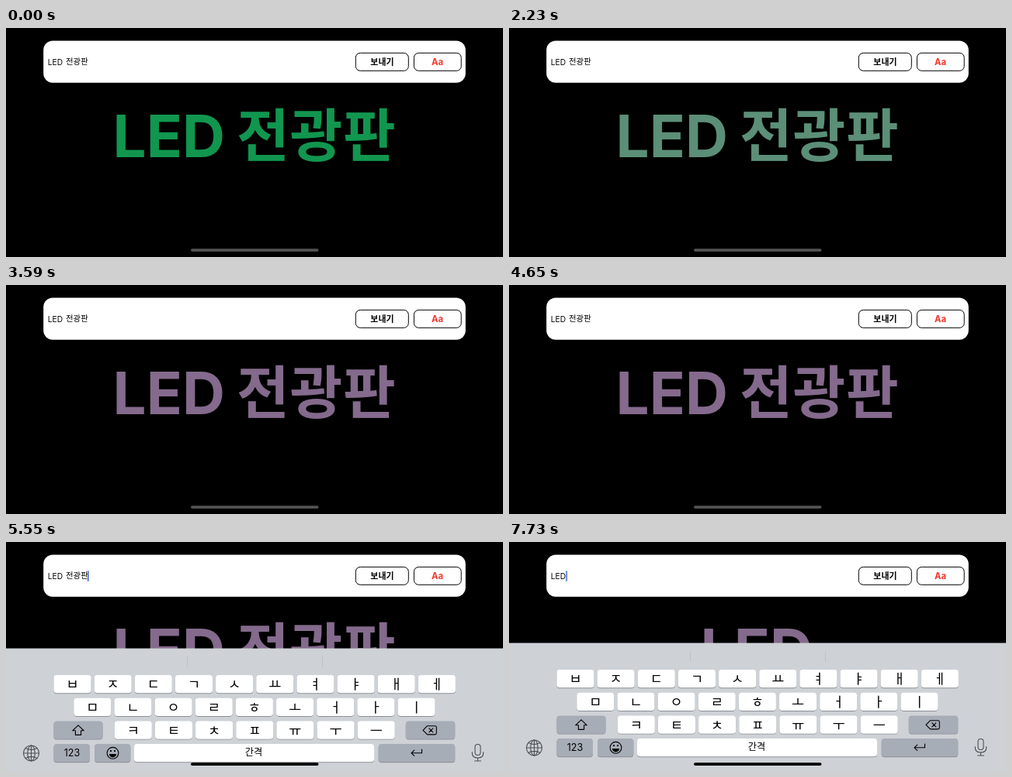
These frames come from a looping animation (640x296 px, 8 s). An HTML page:

```html
<!DOCTYPE html>
<html lang="ko">
<head>
<meta charset="utf-8">
<title>LED 전광판</title>
<style>
  html, body { margin: 0; width: 100%; height: 100%; overflow: hidden; background: #000; }
  svg { display: block; width: 640px; height: 296px; }
  text { font-family: Inter, "Noto Sans CJK KR", "Noto Sans CJK", sans-serif; white-space: pre; }
  .mid { text-anchor: middle; }
  .bold { font-weight: 700; }
  .line { fill: none; stroke: #000; stroke-width: 1.1; stroke-linecap: round; stroke-linejoin: round; }
  .side { stroke: #4c5056; }

  .anim { animation: 8s step-end infinite; }
  .banner { animation-name: tint, recentre; font-weight: 700; }
  .tap { animation-name: tap; fill: #f5352b; }
  .board { animation-name: rise; }
  .home { animation-name: home; }
  .caret { animation-name: caret, blink; fill: #3563d8; }
  .cut1 { animation-name: cut1; }
  .cut2 { animation-name: cut2; }
  .cut3 { animation-name: cut3; }

  @keyframes tint {
    0% { fill: #11964f; }
    12.75% { fill: #3d8157; }
    16.875% { fill: #256a5f; }
    21.125% { fill: #4a7f72; }
    25.125% { fill: #5c8f78; }
    30.75% { fill: #6ea07c; }
    32.25% { fill: #7fd481; }
    36.5% { fill: #82997f; }
    42.125%, 100% { fill: #846a8c; }
  }
  @keyframes tap {
    0% { opacity: 1; }
    11.375% { opacity: .2; }
    12.75% { opacity: .6; }
    14.125% { opacity: 1; }
    15.5% { opacity: .2; }
    16.875% { opacity: .6; }
    18.25% { opacity: 1; }
    19.75% { opacity: .2; }
    21.125% { opacity: .6; }
    22.375% { opacity: 1; }
    23.75% { opacity: .2; }
    25.125% { opacity: .6; }
    26.5% { opacity: 1; }
    35.125% { opacity: .2; }
    36.5% { opacity: .6; }
    37.875% { opacity: 1; }
    40.75% { opacity: .2; }
    42.125% { opacity: .5; }
    43.5% { opacity: .8; }
    44.875%, 100% { opacity: 1; }
  }
  @keyframes rise {
    0% { transform: translateY(170px); }
    66.625% { transform: translateY(132px); }
    68% { transform: translateY(37px); }
    69.375% { transform: translateY(7px); }
    70.75% { transform: translateY(1.5px); }
    72.25% { transform: translateY(.3px); }
    73.75%, 100% { transform: none; }
  }
  @keyframes home {
    0% { fill: #525252; }
    68%, 100% { fill: #000; }
  }
  @keyframes recentre {
    0% { transform: none; }
    79.125% { transform: translateX(70px); }
    80.5%, 100% { transform: translateX(109px); }
  }
  @keyframes caret {
    0% { transform: translateX(105px); }
    77% { transform: translateX(86px); }
    79.125% { transform: translateX(76px); }
    80.5%, 100% { transform: translateX(73.3px); }
  }
  @keyframes blink {
    0% { opacity: 0; }
    64% { opacity: 1; }
    89% { opacity: .4; }
    91.125% { opacity: 0; }
    92.5% { opacity: .1; }
    93.875% { opacity: .35; }
    95.25% { opacity: .7; }
    96.625%, 100% { opacity: 1; }
  }
  @keyframes cut1 { 0% { opacity: 1; } 77%, 100% { opacity: 0; } }
  @keyframes cut2 { 0% { opacity: 1; } 79.125%, 100% { opacity: 0; } }
  @keyframes cut3 { 0% { opacity: 1; } 80.5%, 100% { opacity: 0; } }
</style>
</head>
<body>
<svg viewBox="0 0 640 296">
  <rect width="640" height="296"/>

  <g class="anim banner">
    <text x="137.6" y="167.3" font-size="76.2">LED</text>
    <g font-size="73.6" letter-spacing=".7">
      <text class="anim cut3" x="297.1" y="165.7">전</text>
      <text class="anim cut2" x="365.5" y="165.7">광판</text>
    </g>
  </g>

  <rect x="48.2" y="16.4" width="543.6" height="54.3" rx="12" fill="#fff"/>
  <text x="53.8" y="47.5" font-size="10.2">LED</text>
  <g font-size="10.4">
    <text class="anim cut2" x="77.1" y="47.4">전</text>
    <text class="anim cut1" x="86.6" y="47.4">광판</text>
  </g>
  <rect class="anim caret" y="37" width="1.5" height="14" rx=".7"/>

  <g fill="#fff" stroke="#000">
    <rect x="450.3" y="32.3" width="68" height="23" rx="6"/>
    <rect x="525.4" y="32.3" width="60.8" height="23" rx="6"/>
  </g>
  <text class="mid bold" x="484.4" y="48" font-size="10.9">보내기</text>
  <text class="mid bold anim tap" x="555.6" y="48" font-size="11.3">Aa</text>

  <g class="anim board">
    <rect y="130.5" width="640" height="166" fill="#ced2d6"/>
    <path d="M233.5 141v14M407.5 141v14" stroke="#bec2c7"/>
    <g id="keys"></g>
    <text class="mid" x="85" y="270.4" font-size="12.6">123</text>
    <text class="mid" x="319" y="269.3" font-size="12.2">간격</text>
    <!-- shift, delete, return -->
    <path class="line" d="M93 229.8l7.3 7h-3.7v5.6h-7.2v-5.6h-3.7z"/>
    <path class="line" d="M542.5 230.7h10q1.8 0 1.8 1.8v7.6q0 1.8-1.8 1.8h-10l-5.5-5.6zM544.8 233.8l5 5m0-5l-5 5"/>
    <path class="line" d="M535.5 261v4.8h-13.5m3.7-3.6l-3.7 3.6 3.7 3.6"/>
    <!-- emoji -->
    <circle class="line" cx="137.5" cy="265.8" r="7.4"/>
    <path d="M132.8 267h9.4q-.8 4.4-4.7 4.4t-4.7-4.4z"/>
    <circle cx="135" cy="263.2" r="1.1"/>
    <circle cx="140" cy="263.2" r="1.1"/>
    <!-- globe -->
    <g class="line side">
      <circle cx="32.5" cy="266" r="10"/>
      <ellipse cx="32.5" cy="266" rx="4.7" ry="10"/>
      <path d="M32.5 256v20M22.5 266h20M25 259.6q7.5 4 15 0M25 272.4q7.5-4 15 0"/>
    </g>
    <!-- microphone -->
    <g class="line side">
      <rect x="604" y="254.5" width="7" height="14" rx="3.5"/>
      <path d="M600.3 264.5v1.5q0 6 7.2 6t7.2-6v-1.5M607.5 272v4M603.5 276h8"/>
    </g>
  </g>

  <rect class="anim home" x="238" y="285.2" width="164.5" height="3.8" rx="1.9"/>
</svg>
<script>
  const NS = 'http://www.w3.org/2000/svg';
  const keys = document.getElementById('keys');

  function add(tag, attrs, label) {
    const el = document.createElementNS(NS, tag);
    for (const name in attrs) el.setAttribute(name, attrs[name]);
    if (label) el.textContent = label;
    keys.append(el);
  }

  function key(x, y, width, fill, label) {
    const box = { x, width, height: 23.3, rx: 3.8 };
    add('rect', { ...box, y: y + 0.9, fill: '#8b8f95' });
    add('rect', { ...box, y, fill });
    if (label) add('text', { x: x + width / 2, y: y + 18.2, 'font-size': 17.5, class: 'mid' }, label);
  }

  const rows = [
    [61.5, 165, 'ㅂㅈㄷㄱㅅㅛㅕㅑㅐㅔ'],
    [87.3, 194.7, 'ㅁㄴㅇㄹㅎㅗㅓㅏㅣ'],
    [139.8, 224.4, 'ㅋㅌㅊㅍㅠㅜㅡ']
  ];
  for (const [x, y, letters] of rows)
    [...letters].forEach((c, i) => key(x + i * 52.15, y, 48, '#fff', c));

  const grey = '#a7adb7';
  key(61.5, 224.4, 63, grey);
  key(514.8, 224.4, 63.4, grey);
  key(61.5, 254, 46.5, grey);
  key(114, 254, 46.3, grey);
  key(165, 254, 309, '#fff');
  key(479.7, 254, 98.5, grey);
</script>
</body>
</html>
```
